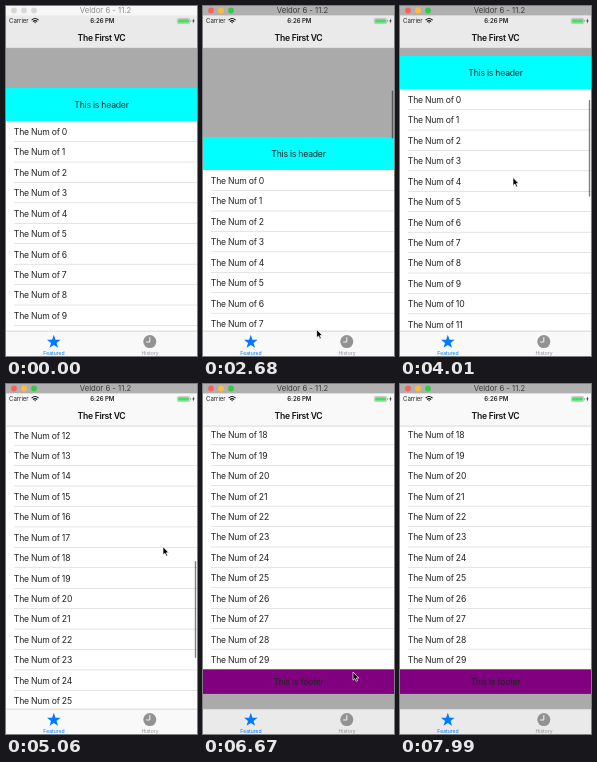
Recreate the animation shown at these times as an HTML page. Size 191 by 350 pixels, loop 8.44 s.

```html
<!DOCTYPE html>
<html lang="en">
<head>
<meta charset="utf-8">
<title>Table view demo</title>
<style>
  html, body { margin: 0; width: 100%; height: 100%; overflow: hidden; background: #fff; }
  svg { display: block; width: 100vw; height: 100vh; }
  text { font-family: Inter, "Liberation Sans", sans-serif; font-size: 8.65px; letter-spacing: -.22px; fill: #222; }
  .mid { text-anchor: middle; }
  .nav { font-weight: 600; letter-spacing: -.28px; fill: #111; }
  .win { font-size: 7.7px; letter-spacing: 0; }
  .status { font-size: 6.1px; letter-spacing: -.05px; }
  .tab { font-size: 5.1px; letter-spacing: 0; }
</style>
</head>
<body>
<svg viewBox="0 0 191 350">
  <rect width="191" height="350" fill="#aaa"/>
  <g id="table"></g>
  <rect id="thumb" x="188.8" width="1.4" rx=".7" fill="#000" fill-opacity=".5"/>

  <rect id="navBar" y="9" width="191" height="33"/>
  <rect y="41.8" width="191" height=".5" fill="#b2b2b2"/>
  <text class="status" x="3" y="17.3">Carrier</text>
  <g fill="none" stroke="#111" stroke-width="1.1">
    <path d="M25.6 14.1Q29.1 10.9 32.6 14.1M27 15.6Q29.1 13.7 31.2 15.6"/>
    <path d="M28.1 16.3h2L29.1 17.5z" fill="#111" stroke="none"/>
  </g>
  <text class="status mid" x="96.3" y="17.3" font-weight="600">6:26 PM</text>
  <rect x="171.3" y="12.4" width="12.4" height="5.2" rx="1.1" fill="none" stroke="#999" stroke-width=".5"/>
  <rect x="172.1" y="13.2" width="10.8" height="3.6" rx=".5" fill="#4cd964"/>
  <rect x="184.3" y="14.1" width=".8" height="1.8" rx=".4" fill="#999"/>
  <path d="M188 12.2L186.2 15.3H187.4L186.8 17.7L188.7 14.6H187.5z" fill="#222"/>
  <text class="nav mid" x="95.5" y="34.7">The First VC</text>

  <rect id="tabBar" y="325" width="191" height="25"/>
  <rect y="324.8" width="191" height=".5" fill="#b2b2b2"/>
  <path id="star" fill="#007aff"/>
  <text class="tab mid" x="48" y="349.2" style="fill:#007aff">Featured</text>
  <circle cx="143.8" cy="335.6" r="6.5" fill="#929292"/>
  <path d="M143.8 331.2V336H140.2" fill="none" stroke="#f5f5f5" stroke-width="1"/>
  <text class="tab mid" x="144" y="349.2" style="fill:#929292">History</text>

  <rect id="winBar" width="191" height="9.4"/>
  <g id="lights"></g>
  <text id="winTitle" class="win mid" x="99.5" y="7.2">Veldor 6 - 11.2</text>

  <path id="cursor" d="M0 0V8.2L1.9 6.5L3.2 9.4L4.6 8.8L3.3 6H5.8z" fill="#000" stroke="#fff" stroke-width=".7"/>
</svg>
<script>
const LOOP = 8440, FIRST = 750, TICK = 147.7;
const PRESS = 2070, LEAVE = 7980;
const ROW = 20.43, ROWS = 30, HEAD = 33, FOOT = 24.5;
const FOOT_Y = HEAD + ROWS * ROW, CONTENT = FOOT_Y + FOOT;
const TOP = 82, END = -360.5, PEEK = 32;
const GRAY = [170, 170, 170], CYAN = [0, 255, 255], WHITE = [255, 255, 255], PURPLE = [128, 0, 128];

const $ = id => document.getElementById(id);
const set = (el, attrs) => { for (const k in attrs) el.setAttribute(k, attrs[k]); };
const rgb = c => `rgb(${c.map(Math.round)})`;

function add(parent, tag, attrs, label) {
  const el = document.createElementNS('http://www.w3.org/2000/svg', tag);
  set(el, attrs);
  if (label) el.textContent = label;
  $(parent).append(el);
  return el;
}

function band(y, h, color, label) {
  add('table', 'rect', { y, width: 191, height: h, fill: rgb(color) });
  if (label) add('table', 'text', { class: 'mid', x: 95.5, y: y + h / 2 + 3.6 }, label);
}

band(0, HEAD, CYAN, 'This is header');
band(HEAD, ROWS * ROW, WHITE);
for (let i = 0; i < ROWS; i++) {
  const y = HEAD + i * ROW;
  add('table', 'text', { x: 7.8, y: y + ROW / 2 + 3.8 }, 'The Num of ' + i);
  add('table', 'rect', { x: 8, y: y + ROW - .1, width: 183, height: .5, fill: '#c8c7cc' });
}
band(FOOT_Y, FOOT, PURPLE, 'This is footer');

const points = Array.from({ length: 10 }, (_, i) => {
  const r = i % 2 ? 2.9 : 7.2, a = i * Math.PI / 5;
  return `${(47.8 + r * Math.sin(a)).toFixed(2)} ${(336 - r * Math.cos(a)).toFixed(2)}`;
});
set($('star'), { d: `M${points.join('L')}z` });

const lit = ['#fc605c', '#fdbc40', '#34c84a'];
const lights = lit.map((_, i) => add('lights', 'circle', { cx: 8 + 10 * i, cy: 4.5, r: 2.9 }));

// Timing helpers
const part = (t, a, b) => Math.min(1, Math.max(0, (t - a) / (b - a)));
const ramp = (t, a, b) => { const p = part(t, a, b); return p * p * (3 - 2 * p); };
const bounce = (t, a, peak, b) => t < peak ? ramp(t, a, peak) : (1 - part(t, peak, b)) ** 2;
const shown = (t, a, b) => ramp(t, a, a + TICK) * (1 - ramp(t, b, b + 2 * TICK));

// Pull down, drag up a little, fling to the end, then overscroll twice
const tableTop = t => TOP
  + 49 * bounce(t, PRESS, 2670, 3110)
  - PEEK * ramp(t, 3400, 3990)
  - (TOP - PEEK - END) * ramp(t, 4530, 5320)
  - 22 * bounce(t, 5640, 5790, 6060)
  - 25 * bounce(t, 6660, 6810, 7260);

// Pointer strokes: start, end, x, y reached
const strokes = [
  [750, 1040, 92.5, 188], [1350, 1780, 113, 226], [PRESS, 2670, 113.7, 323.5],
  [2830, 3990, 113, 171.5], [4200, 4600, 145, 295], [4600, 4900, 157, 162.7],
  [5200, 5640, 140, 282], [5640, 5930, 128.4, 207.7], [6080, 6510, 150, 288],
  [6660, 6960, 161.3, 222], [7120, 7690, 121.5, 329.5], [7690, 7830, 135, 341]
];

function pointer(t) {
  let x = 0, y = 149;
  for (const [a, b, toX, toY] of strokes) {
    const p = ramp(t, a, b);
    x += (toX - x) * p;
    y += (toY - y) * p;
  }
  return `translate(${x} ${y})`;
}

// Average colour of the content below a translucent bar
function tint(a, b, y) {
  const edges = [-9999, y, y + HEAD, y + FOOT_Y, y + CONTENT, 9999];
  const sum = [0, 0, 0];
  [GRAY, CYAN, WHITE, PURPLE, GRAY].forEach((c, i) => {
    const share = Math.max(0, Math.min(b, edges[i + 1]) - Math.max(a, edges[i])) / (b - a);
    c.forEach((v, j) => sum[j] += v * share);
  });
  return rgb(sum.map(v => 248 * .82 + v * .18));
}

function draw(now) {
  const t = FIRST + TICK * Math.floor((now - FIRST) / TICK);
  const y = tableTop(t);
  set($('table'), { transform: `translate(0 ${y})` });
  set($('navBar'), { fill: tint(10, 42, y) });
  set($('tabBar'), { fill: tint(325, 350, y) });

  const over = Math.max(0, y - TOP, END - y);
  set($('thumb'), {
    y: 84.5 + 128 * part(y, TOP, END) + (y < END ? over : 0),
    height: 97 - over,
    opacity: shown(t, PRESS - TICK, 3100) + shown(t, 3400, 6200) + shown(t, 6650, 7400)
  });

  const active = t >= PRESS;
  set($('winBar'), { fill: active ? '#b0b0b0' : '#f6f6f6' });
  set($('winTitle'), { style: `fill:${active ? '#3c3c3c' : '#909090'}` });
  lights.forEach((el, i) => set(el, { fill: active ? lit[i] : '#d8d8d8' }));

  set($('cursor'), {
    transform: pointer(t),
    visibility: t >= FIRST && t < LEAVE ? 'visible' : 'hidden'
  });
}

const start = performance.now();
function loop() {
  draw((performance.now() - start) % LOOP);
  requestAnimationFrame(loop);
}
loop();
</script>
</body>
</html>
```
